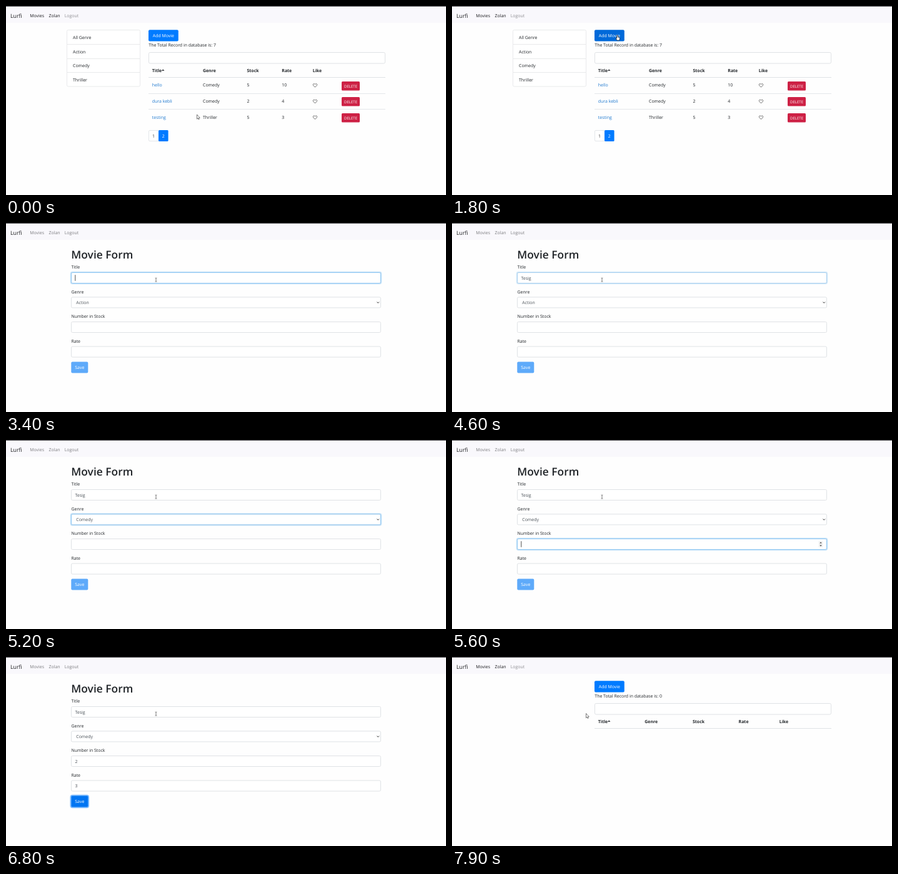
An HTML page that plays this animation: 704x303 px, repeating every 8 s.

```html
<!DOCTYPE html>
<html lang="en">
<head>
<meta charset="utf-8">
<title>Movie form</title>
<style>
  html, body { margin: 0; width: 100%; height: 100%; overflow: hidden; background: #fefefe; }
  svg { display: block; width: 704px; height: 303px; text-rendering: geometricPrecision; }
  text { font: 6.95px "Open Sans", "Noto Sans", sans-serif; fill: #212529; white-space: pre; }
  .b { font-weight: 700; }
  .brand { font-size: 8.8px; }
  .h1 { font-size: 17.4px; font-weight: 600; }
  .sm { font-size: 6.07px; }
</style>
</head>
<body>
<svg viewBox="0 0 704 303"><g id="page"></g><path id="caret" stroke="#222" stroke-width=".8"/><g id="pointer"></g></svg>
<script>
const LOOP = 8000, STEP = 100;
const BLUE = '#007bff', LINE = '#e4e7ea', EDGE = '#dfe2e5', GRAY = '#7d7d80', FIELD = '#495057';
const page = document.getElementById('page');
const caret = document.getElementById('caret');
const pointer = document.getElementById('pointer');

// Each step patches the state before it.
const steps = [
  [0, { view: 'list', full: true, button: BLUE, buttonRing: 0, values: ['', '', '', ''],
        rings: [], caret: -1, spin: -1, ready: false }],
  [1700, { button: '#0069d9' }],
  [1900, { button: '#0062cc' }],
  [2000, { buttonRing: 1 }],
  [2100, { view: 'form' }],
  [2300, { values: ['', 'Action', '', ''] }],
  [2700, { rings: [.5], caret: 0 }],
  [2800, { rings: [1] }],
  [3100, { caret: -1 }],
  [3400, { caret: 0 }],
  [3500, { values: ['T', 'Action', '', ''] }],
  [3600, { values: ['Te', 'Action', '', ''] }],
  [3800, { values: ['Tes', 'Action', '', ''] }],
  [4200, { values: ['Tesi', 'Action', '', ''] }],
  [4500, { values: ['Tesig', 'Action', '', ''] }],
  [4600, { rings: [.7], caret: -1 }],
  [4700, { rings: [0, 1] }],
  [5200, { values: ['Tesig', 'Comedy', '', ''] }],
  [5600, { rings: [0, 0, 1], caret: 2, spin: 2 }],
  [5900, { values: ['Tesig', 'Comedy', '2', ''] }],
  [6200, { rings: [0, 0, .5, .5], caret: 3, spin: 3 }],
  [6300, { rings: [0, 0, 0, 1] }],
  [6600, { values: ['Tesig', 'Comedy', '2', '3'], ready: true }],
  [6700, { rings: [0, 0, 0, .5, .5], caret: -1, spin: -1 }],
  [6800, { rings: [0, 0, 0, 0, 1] }],
  [7500, { view: 'list', full: false, button: BLUE, buttonRing: 0 }]
];

// time, x, y
const route = [
  [0, 305.5, 174], [1100, 305.5, 174], [1800, 264.5, 46.5],
  [2200, 264.5, 46.5], [2500, 240, 91], [7800, 240, 91], [7900, 214.5, 90.5], [LOOP, 214.5, 90.5]
];

const fields = [['Title', 79.5, 17], ['Genre', 118.9, 17], ['Number in Stock', 158.5, 17], ['Rate', 198, 17]];
const rows = [['hello', 'Comedy', 5, 10], ['dura kebli', 'Comedy', 2, 4], ['testing', 'Thriller', 5, 3]];

const shapes = {
  arrow: '<path d="M0 0V7.2L1.6 5.7 2.7 8 3.7 7.5 2.7 5.3H4.8Z" fill="#fff" stroke="#444" stroke-width=".7"/>',
  hand: '<path d="M-.8 .7Q0-.6 .8 .7V3.3L3.4 4Q4.2 4.3 4 5.4L3.4 8.6H-.4L-2.3 5.6Q-2.4 4.6-.8 5.2Z" fill="#fff" stroke="#222" stroke-width=".8"/>',
  beam: '<path d="M-1.4-2.9Q0-2.9 0-2.3Q0-2.9 1.4-2.9M0-2.3V2.6M-1.4 3.2Q0 3.2 0 2.6Q0 3.2 1.4 3.2" fill="none" stroke="#444" stroke-width=".7"/>'
};

const text = (x, y, s, fill = '#212529', cls = '', anchor = 'start') =>
  `<text x="${x}" y="${y}" class="${cls}" style="fill:${fill}" text-anchor="${anchor}">${s}</text>`;
const rect = (x, y, w, h, fill, stroke = 'none', r = 0, extra = '') =>
  `<rect x="${x}" y="${y}" width="${w}" height="${h}" rx="${r}" fill="${fill}" stroke="${stroke}" ${extra}/>`;
const hline = (x, y, w, color = LINE) => rect(x, y, w, 1, color);
const ring = (x, y, w, h, k) => k
  ? rect(x - .8, y - .8, w + 1.6, h + 1.6, 'none', '#2f9be8', 2.5, `stroke-width="1.8" stroke-opacity="${.28 * k}"`) : '';

function nav(active) {
  const ink = active ? '#1c1c1f' : GRAY;
  return rect(0, 0, 704, 27, '#f9f8fc') + rect(0, 0, 704, 1, '#4a4a4e') +
    text(7, 18.5, 'Lurfi', '#1c1c1f', 'brand') + text(38.3, 17.6, 'Movies', ink) +
    text(68.6, 17.6, 'Zolan', ink) + text(93.7, 17.6, 'Logout', active ? '#8e8e92' : GRAY);
}

function tableRow([title, genre, stock, rate], i) {
  const y = 129.3 + i * 25.7, top = Math.round(120.5 + i * 25.7);
  const heart = `<path transform="translate(494.5 ${y - 2.2})" d="M0 3.1L-2.8 .2C-4-1.4-2.2-3.8 0-1.6C2.2-3.8 4-1.4 2.8 .2Z" fill="none" stroke="#333" stroke-width=".7"/>`;
  return (i ? hline(228, Math.round(114 + i * 25.7), 379) : '') +
    text(233.8, y, title, '#1f79cf') + text(315, y, genre) + text(385.5, y, stock) + text(441.3, y, rate) + heart +
    rect(537, top, 29, 14.5, '#cd2145', 'none', 1.5) + text(551.5, top + 9.5, 'DELETE', '#fff', 'sm', 'middle');
}

function list(s) {
  let out = nav(true);
  if (s.full) {
    out += rect(97.5, 38.5, 117, 90.5, '#fff', '#e9eaeb', 2);
    ['All Genre', 'Action', 'Comedy', 'Thriller'].forEach((g, i) => {
      out += (i ? hline(98, Math.round(38.3 + i * 22.6), 116, '#e9eaeb') : '') + text(107, 53 + i * 22.6, g);
    });
  }
  out += ring(228, 38.5, 47.7, 18, s.buttonRing) + rect(228, 38.3, 47.8, 18.2, s.button, 'none', 2) +
    text(251.9, 50.2, 'Add Movie', '#fff', '', 'middle') +
    text(228.3, 64.7, 'The Total Record in database is: ' + (s.full ? 7 : 0)) +
    rect(228.5, 74.5, 378, 17.5, '#fff', EDGE, 2);
  const cols = s.full ? [233.8, 315, 385.5, 441.3, 490.8] : [233.8, 308.3, 385, 458.6, 523.8];
  ['Title', 'Genre', 'Stock', 'Rate', 'Like'].forEach((h, i) => out += text(cols[i], 106.4, h, '#212529', 'b'));
  out += '<path d="M249 103.8L251.2 101.4 253.5 103.8Z" fill="#212529"/>' + hline(228, 114, 379, '#dfe2e5');
  if (s.full) {
    out += rows.map(tableRow).join('') + rect(228.5, 199.5, 16, 17, '#fff', LINE, 1.5) +
      rect(244, 199, 15.6, 18, BLUE, 'none', 1.5) +
      text(236, 211.1, '1', '#333', '', 'middle') + text(251.7, 211.1, '2', '#fff', '', 'middle');
  }
  return out;
}

function spinner(y) {
  return rect(586.5, y - 5, 7, 10, '#f3f3f3') +
    `<path d="M588.2 ${y - 1.4}h3.6l-1.8-2.2ZM588.2 ${y + 1.4}h3.6l-1.8 2.2Z" fill="#444"/>`;
}

function form(s) {
  let out = nav(false) + text(104.3, 57, 'Movie Form', '#212529', 'h1');
  fields.forEach(([label, y, h], i) => {
    const k = s.rings[i] || 0, mid = y + h / 2;
    out += text(104.5, y - 6.4, label) + ring(104.5, y, 495, h, k) + rect(104.5, y, 495, h, '#fff', EDGE, 2) +
      (k ? rect(104.5, y, 495, h, 'none', '#8fc6f2', 2, `opacity="${k}"`) : '') +
      text(i === 1 ? 112.3 : 110.5, mid + 2.7, s.values[i], FIELD, 'v' + i);
    if (i === 1) out += `<path d="M593.6 ${mid - .9}l1.7 1.8 1.7-1.8" fill="none" stroke="#333" stroke-width="1"/>`;
    if (s.spin === i) out += spinner(mid);
  });
  return out + (s.rings[4] ? rect(103.5, 221.7, 28.6, 19.6, 'none', BLUE, 3, `stroke-width="2" stroke-opacity="${.5 * s.rings[4]}"`) : '') +
    rect(104.3, 222.5, 27, 18, s.ready ? (s.rings[4] ? '#0075f2' : BLUE) : '#5eaafa', 'none', 2) +
    text(117.8, 234.2, 'Save', '#fff', '', 'middle');
}

function position(t) {
  const i = route.findIndex(p => p[0] > t);
  const [t0, x0, y0] = route[i - 1], [t1, x1, y1] = route[i];
  const u = (t - t0) / (t1 - t0), k = u * u * (3 - 2 * u);
  return [x0 + (x1 - x0) * k, y0 + (y1 - y0) * k];
}

function pointerShape(view, x, y) {
  const inside = (l, t, r, b) => x >= l && x <= r && y >= t && y <= b;
  if (view === 'list') {
    if (inside(228, 38, 276, 57)) return 'hand';
    return inside(228, 74, 607, 92.5) ? 'beam' : 'arrow';
  }
  return inside(104, 79, 600, 97) ? 'beam' : 'arrow';
}

function draw(t) {
  const s = Object.assign({}, ...steps.filter(p => p[0] <= t).map(p => p[1]));
  page.innerHTML = s.view === 'list' ? list(s) : form(s);
  if (s.view === 'form' && s.caret >= 0) {
    const [, y, h] = fields[s.caret];
    const x = 110.8 + page.querySelector('.v' + s.caret).getComputedTextLength();
    caret.setAttribute('d', `M${x} ${y + h / 2 - 4.8}v9.6`);
  } else caret.setAttribute('d', '');
  const [x, y] = position(t);
  pointer.setAttribute('transform', `translate(${x} ${y})`);
  pointer.innerHTML = shapes[pointerShape(s.view, x, y)];
}

let last = -1;
function tick() {
  const t = Math.floor(performance.now() % LOOP / STEP) * STEP;
  if (t !== last) draw(last = t);
  requestAnimationFrame(tick);
}
tick();
</script>
</body>
</html>
```
